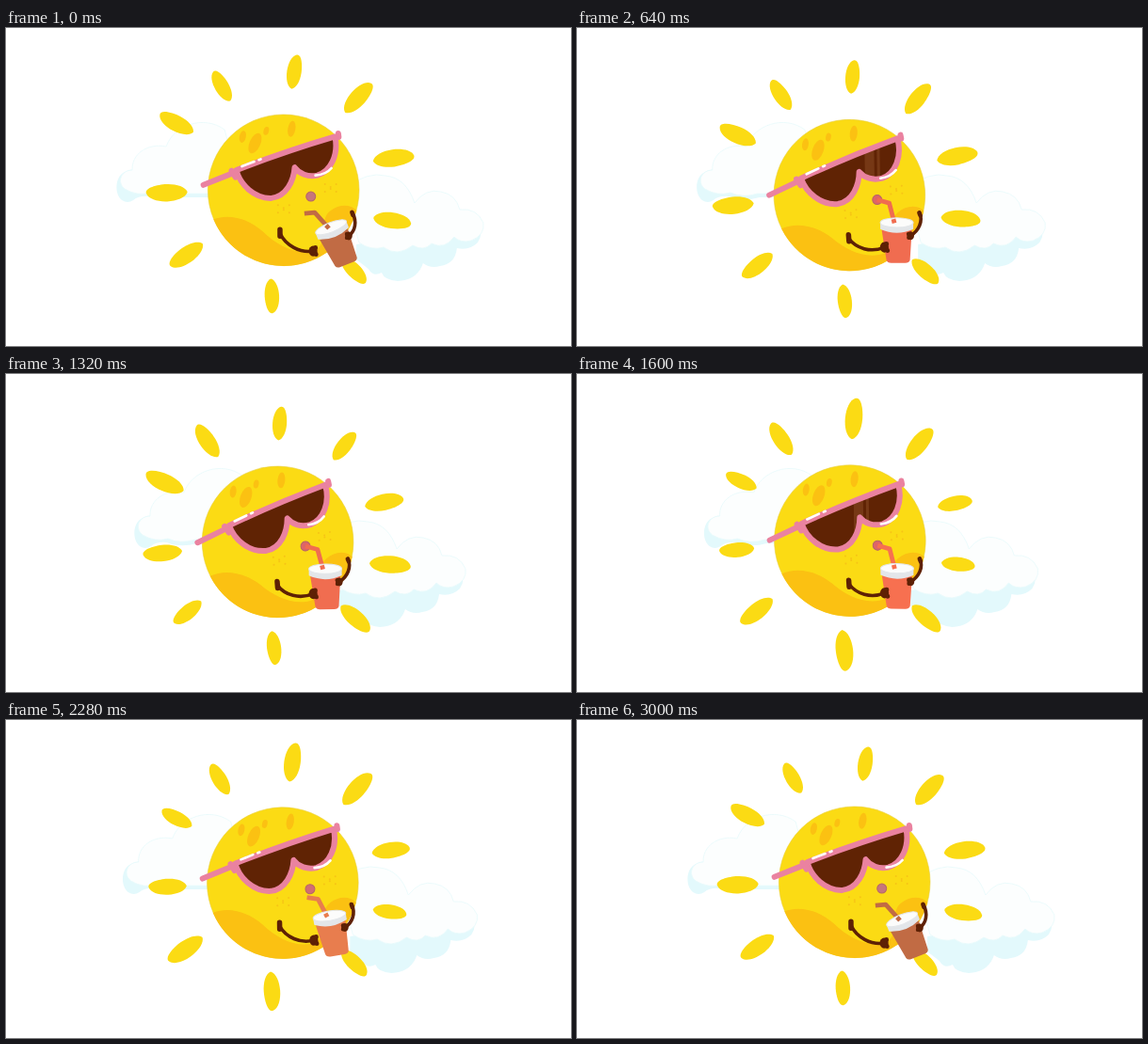
An HTML page for the animation above (3.04 s loop, 600 by 338 pixels).

```html
<!DOCTYPE html>
<html lang="en">
<head>
<meta charset="utf-8">
<title>Sun with a cold drink</title>
<style>
  html, body { margin: 0; width: 100%; height: 100%; overflow: hidden; background: #fff; }
  svg { display: block; width: 100%; height: 100%; }
  .rim { fill: none; stroke: #ea82a0; stroke-width: 6; stroke-linecap: round; stroke-linejoin: round; }
  .shine { fill: none; stroke: #fff; stroke-width: 2.6; stroke-linecap: round; }
  .shade { fill: #fbc112; }
  .arm { fill: none; stroke: #5e2105; stroke-width: 3.6; stroke-linecap: round; stroke-linejoin: round; }
  .hand { fill: #5e2105; }
  .under { fill: #e3f9fc; }
  .puff { fill: #fcfefe; stroke: #e8fafc; stroke-width: .8; }
</style>
</head>
<body>
<svg viewBox="0 0 600 338">
  <defs>
    <path id="lensShape" d="M-50-21.5Q3-41.5 55-56.5C59-37 50-19.5 36-15.5C26-13.5 17-17 12-24C11-10 3 7 -13 8.5C-31 9-46-6-50-21.500Z"/>
    <clipPath id="lensClip"><use href="#lensShape"/></clipPath>
  </defs>

  <g id="cloudLeft">
    <path class="under" d="M123 183C115 177 115 158 126 153C130 150 136 150 138 151C148 150 240 145 250 150V180H184Q166 185 152 179Q141 178 135 183Q129 187 123 183Z"/>
    <path class="puff" d="M126 171C117 164 122 151 134 151C133 134 150 122 170 126C178 103 210 92 232 108L250 176H182Q166 181 153 175Q139 179 126 171Z"/>
  </g>
  <g id="cloudRight">
    <path class="under" d="M372 230L500 210Q508 218 501 228Q492 237 479 234Q477 251 461 253Q451 256 443 250Q437 268 416 269Q402 268 399 260Q390 265 385 256L372 246Z"/>
    <path class="puff" d="M360 170Q385 152 403 157Q425 159 434 186Q446 170 462 174Q478 177 482 193Q500 191 507 207Q509 220 494 226Q483 229 476 222Q466 236 452 229Q444 238 432 231Q416 244 401 233Q388 237 375 228Z"/>
  </g>

  <g id="sun">
    <g id="rays" fill="#fbdb14"></g>
    <circle r="80.3" fill="#fbdb14" stroke="#e9cf3a" stroke-width=".6"/>
    <path class="shade" d="M-74.5 30.5C-60 25-40 28-22 44C-6 60 15 70 34 64C48 56 36 32 50 22C59 15 71 15 77.500 22A80.500 80.500 0 0 1-74.500 30.500Z"/>
    <g class="shade">
      <ellipse cx="-43" cy="-57" rx="3.4" ry="6.500" transform="rotate(12 -43 -57)"/>
      <ellipse cx="-30" cy="-50" rx="5.800" ry="11.500" transform="rotate(24 -30 -50)"/>
      <ellipse cx="-18" cy="-63" rx="2.800" ry="4.500" transform="rotate(15 -18 -63)"/>
      <ellipse cx="9" cy="-65" rx="4" ry="8.500" transform="rotate(10 9 -65)"/>
    </g>
    <g id="freckles" fill="#f6c416"></g>

    <path class="rim" d="M-85-6L-52-19"/>
    <use href="#lensShape" fill="#602304"/>
    <g clip-path="url(#lensClip)">
      <path id="gleam" fill="#83441f" opacity=".65" d="M-7-70H3V20H-7ZM6-70H9V20H6Z"/>
    </g>
    <use href="#lensShape" class="rim"/>
    <path class="rim" d="M-55-21L-51-14M58.500-60L59-56"/>
    <path class="shine" d="M-44-25.500L-31-30.500M-26-32.300L-24-33M34-15.500Q45-16 51-23"/>

    <circle id="mouth" cx="29" cy="7" r="5" stroke="#b5656a" stroke-width="1"/>
    <path id="straw" fill="none" stroke-width="4.800" stroke-linejoin="round"/>
    <g id="cup">
      <path id="cupBody" d="M-17-14H15L13 18Q12 21 8 21H-7Q-11 21-12 18Z"/>
      <path d="M-18.500-22V-15Q-1-7 16.500-15V-22Z" fill="#e3e6e9"/>
      <ellipse cx="-1" cy="-22" rx="17.500" ry="5.200" fill="#fcfcfb" stroke="#e3e6e9" stroke-width="1"/>
    </g>
    <path id="strawFoot" fill="none" stroke-width="4.800"/>
    <path id="armLeft" class="arm"/>
    <path id="armRight" class="arm"/>
    <path class="arm" d="M-4 42L-4 49" style="stroke-width:5.500"/>
    <path class="arm" d="M72.500 24L73.500 27" style="stroke-width:4.500"/>
    <g id="handLeft" class="hand"><ellipse rx="4.600" ry="5.600"/><circle cx="2.500" cy="-3.500" r="2.500"/><circle cx="3" cy="3.500" r="2.500"/></g>
    <g id="handRight" class="hand"><ellipse rx="3.800" ry="4.500"/><circle cx="-2" cy="2" r="2.200"/><circle cx="-2" cy="-2" r="2.200"/></g>
  </g>
</svg>
<script>
const STEP = 40, LOOP = 3040, CYCLE = 3000;
const $ = id => document.getElementById(id);
const set = (el, attr, value) => el.setAttribute(attr, value);
const add = (parent, name, attrs) => {
  const el = document.createElementNS('http://www.w3.org/2000/svg', name);
  for (const key in attrs) set(el, key, attrs[key]);
  return parent.appendChild(el);
};
const lerp = (a, b, k) => a + (b - a) * k;
const mix = (a, b, k) => a.map((v, i) => lerp(v, b[i], k));
const ease = k => (1 - Math.cos(Math.PI * Math.min(1, Math.max(0, k)))) / 2;
const wrap = (v, n) => ((v % n) + n) % n;

// Smooth swing from 0 at time `low` to 1 at time `high` and back.
function swing(t, low, high) {
  const u = wrap(t - low, CYCLE), rise = wrap(high - low, CYCLE);
  return ease(u < rise ? u / rise : (CYCLE - u) / (CYCLE - rise));
}

// direction, inner radius, tilt
const rays = [
  [-84.5, 107.8, -81], [-50.8, 105.3, -48], [-15.9, 99.7, -8], [16, 99.7, 8], [49.1, 95.5, 45],
  [96.6, 94.8, 87], [146.5, 103, 145], [179, 102, 178], [212.3, 113.7, 208], [239.6, 110.3, 240]
].map(([dir, inner, tilt]) => ({
  dir: dir * Math.PI / 180, inner, tilt,
  el: add($('rays'), 'path', { d: 'M-1 0C-.9-.28-.45-.42 0-.42S.9-.28 1 0S.45 .42 0 .42S-.9 .28-1 0Z' })
}));

for (const [x, y] of [[0, 18], [50, -4]])
  for (let i = 0; i < 6; i++)
    add($('freckles'), 'circle', { cx: x - 6 + (i % 3) * 6, cy: y - 2 + (i % 2) * 5 + (i > 2 ? 3 : 0), r: 1 });

const drinkColors = [
  [0, [193, 107, 68]], [640, [240, 108, 80]], [1040, [232, 106, 80]], [1600, [247, 112, 80]],
  [1960, [237, 125, 78]], [2640, [226, 125, 78]], [3000, [193, 107, 68]]
];
function drinkColor(t) {
  const i = Math.max(1, drinkColors.findIndex(key => key[0] >= t));
  const [t0, a] = drinkColors[i - 1], [t1, b] = drinkColors[i];
  return mix(a, b, (t - t0) / (t1 - t0));
}
const rgb = c => `rgb(${c.map(Math.round)})`;

function drawDrink(t) {
  const sip = ease((t - 120) / 440) * (1 - ease((t - 2000) / 560));
  const at = (rest, drink) => mix(rest, drink, sip);
  const color = drinkColor(t);

  const [cx, cy, angle] = at([59, 60, -21], [47.5, 54.7, 4]);
  set($('cup'), 'transform', `translate(${cx} ${cy}) rotate(${angle})`);
  set($('cupBody'), 'fill', rgb(color));

  const tip = at([22, 25], [29, 7]), bend = at([33, 24], [41.5, 11.5]), foot = at([48, 41], [45.5, 33]);
  set($('straw'), 'd', `M${tip}L${bend}L${foot}`);
  set($('strawFoot'), 'd', `M${mix(bend, foot, .8)}L${foot}`);
  for (const id of ['straw', 'strawFoot']) set($(id), 'stroke', rgb(color));
  set($('mouth'), 'fill', rgb(mix([198, 118, 124], [222, 100, 104], sip)));

  const left = at([31, 65], [33, 58]), right = at([69, 49], [61.6, 47.6]);
  set($('armLeft'), 'd', `M-4 46C${at([2, 59], [3, 57])} ${at([17, 67], [18, 63])} ${left}`);
  set($('armRight'), 'd', `M73 24C${at([78, 34], [76, 33])} ${at([76, 44], [71, 43])} ${right}`);
  set($('handLeft'), 'transform', `translate(${left})`);
  set($('handRight'), 'transform', `translate(${right})`);
}

function draw(t) {
  const drift = 19 * swing(t, 2930, 1320);
  set($('cloudLeft'), 'transform', `translate(${drift})`);
  set($('cloudRight'), 'transform', `translate(${-drift})`);

  const lean = swing(t, 2800, 980);
  set($('sun'), 'transform', `translate(${295.2 - 7.2 * lean} ${171.8 + 7.2 * lean}) rotate(${-5 * lean})`);

  rays.forEach(({ dir, inner, tilt, el }, i) => {
    const half = 19.8 + 2.1 * Math.cos((t - 375 - 120 * i) / 600 * 2 * Math.PI);
    const r = inner + half;
    set(el, 'transform', `translate(${r * Math.cos(dir)} ${r * Math.sin(dir)}) rotate(${tilt}) scale(${half})`);
  });

  const sweep = (t % 1000 - 350) / 500;
  set($('gleam'), 'transform', `translate(${lerp(-66, 89, sweep)}) rotate(3)`);
  set($('gleam'), 'visibility', sweep > 0 && sweep < 1 ? 'visible' : 'hidden');

  drawDrink(t);
}

const start = performance.now();
function tick() {
  const t = (performance.now() - start) % LOOP;
  draw(Math.floor(t / STEP) * STEP);
  requestAnimationFrame(tick);
}
tick();
</script>
</body>
</html>
```
